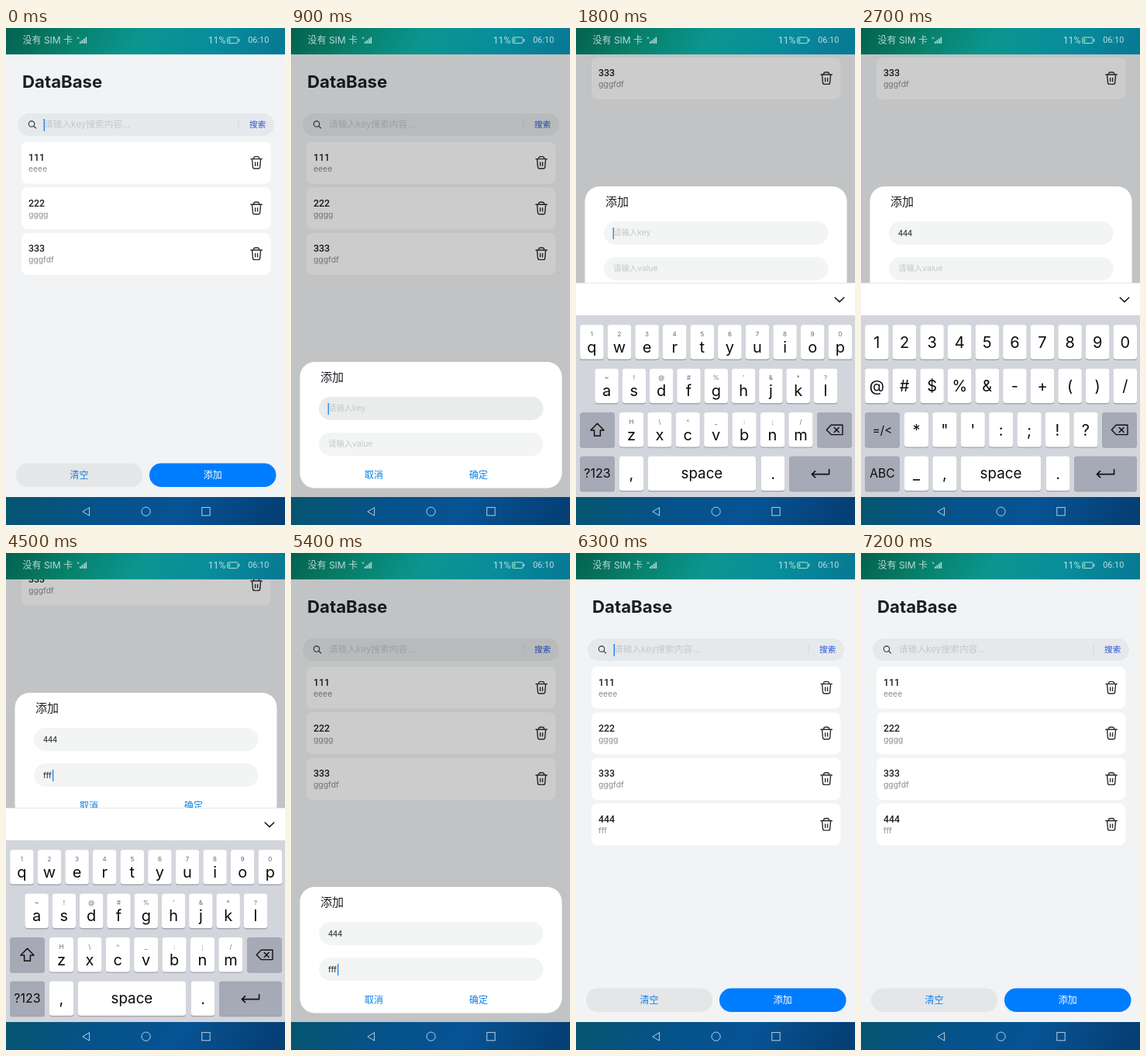
An HTML page for the animation above (8000 ms loop, 360 by 640 pixels).

```html
<!DOCTYPE html>
<html lang="zh-CN">
<head>
<meta charset="utf-8">
<title>DataBase</title>
<style>
html, body { margin: 0; width: 100%; height: 100%; overflow: hidden; background: #f1f3f5; }
svg { display: block; width: 100vw; height: 100vh; }
text { font-family: Inter, "Noto Sans CJK SC", "Noto Sans CJK", sans-serif; white-space: pre; }
.num { font-family: Roboto, "Noto Sans CJK SC", sans-serif; }
.line { fill: none; stroke-linecap: round; stroke-linejoin: round; }
</style>
</head>
<body>
<svg id="stage" viewBox="0 0 360 640">
  <defs>
    <linearGradient id="top" x2="1" y2="0.06">
      <stop offset="0" stop-color="#046150"/>
      <stop offset=".25" stop-color="#07806a"/>
      <stop offset=".5" stop-color="#0b9690"/>
      <stop offset=".78" stop-color="#088c9c"/>
      <stop offset="1" stop-color="#087b94"/>
    </linearGradient>
    <linearGradient id="bottom" x2="1" y2="0.06">
      <stop offset="0" stop-color="#05566f"/>
      <stop offset=".35" stop-color="#06528a"/>
      <stop offset=".65" stop-color="#075394"/>
      <stop offset="1" stop-color="#053f74"/>
    </linearGradient>
  </defs>
</svg>
<script>
const NS = 'http://www.w3.org/2000/svg';
const LOOP = 8000;
const BLUE = '#0a7fe8', INK = '#1b1f24', HINT = '#c5c8cb';
const stage = document.getElementById('stage');

function add(parent, tag, attrs = {}) {
  const el = document.createElementNS(NS, tag);
  for (const k in attrs) el.setAttribute(k, attrs[k]);
  return parent.appendChild(el);
}
const group = (parent, attrs) => add(parent, 'g', attrs);
const box = (parent, x, y, width, height, fill, rx = 0) =>
  add(parent, 'rect', { x, y, width, height, fill, rx });
const line = (parent, d, stroke, w = 1.4) =>
  add(parent, 'path', { d, stroke, class: 'line', 'stroke-width': w });
function label(parent, x, y, str, size, fill, extra = {}) {
  const el = add(parent, 'text', { x, y, 'font-size': size, fill, ...extra });
  el.textContent = str;
  return el;
}
const MID = { 'text-anchor': 'middle' };
const MEDIUM = { 'font-weight': 500 };
const show = (el, on) => el.setAttribute('display', on ? 'inline' : 'none');

// Page with list
const page = group(stage);
box(page, 0, 0, 360, 900, '#f1f3f5');
label(page, 21, 77, 'DataBase', 22.2, INK, { 'font-weight': 700 });

box(page, 15, 110, 331, 29, '#e6e9eb', 14.5);
add(page, 'circle', { cx: 33, cy: 123.6, r: 3.7, class: 'line', stroke: '#333', 'stroke-width': 1.1 });
line(page, 'M35.8 126.4L38.6 129', '#333', 1.1);
label(page, 49, 128.3, '请输入key搜索内容...', 11.7, HINT);
box(page, 299.5, 118, 1, 12, '#d3d6d9');
label(page, 324.7, 127.6, '搜索', 10.6, '#2b55d6', { ...MID, ...MEDIUM });
const searchCaret = box(page, 48.6, 117, 1.4, 16, '#1a80ee');

function card(i, key, value) {
  const g = group(page, { transform: `translate(0 ${i * 58.7})` });
  box(g, 20, 146.5, 321.5, 54, '#fff', 8);
  label(g, 29, 171, key, 12.4, INK, { ...MEDIUM, class: 'num' });
  label(g, 29, 185, value, 10.4, '#8b8e91');
  line(g, 'M315.9 168.6H330.3M319.3 168.4Q319.8 165.6 321.6 165.6H324.6Q326.4 165.6 326.9 168.4'
    + 'M317.6 168.8L318.5 179Q318.7 181 320.6 181H325.6Q327.5 181 327.7 179L328.6 168.8'
    + 'M321.6 173V177.4M324.6 173V177.4', '#2a2d31', 1.4);
  return g;
}
[['111', 'eeee'], ['222', 'gggg'], ['333', 'gggfdf']].forEach((r, i) => card(i, ...r));
const newCard = card(3, '444', 'fff');

box(page, 13, 560.5, 163, 30.5, '#e4e6e8', 15.2);
label(page, 94.5, 580, '清空', 12, '#157fe8', { ...MID, ...MEDIUM });
box(page, 185, 560.5, 163.5, 30.5, '#007dff', 15.2);
label(page, 266.7, 580, '添加', 12, '#fff', { ...MID, ...MEDIUM });

// Dialog
const shade = box(stage, 0, 0, 360, 640, '#000');
shade.setAttribute('fill-opacity', 0.2);
const dialog = group(stage);
box(dialog, 11.5, 430, 338, 162.5, '#fff', 19);
label(dialog, 38, 454.6, '添加', 15, INK, MEDIUM);

function field(y, hint, text, cls) {
  const bg = box(dialog, 36, y, 289.5, 30, '#f3f4f4', 15);
  const ghost = label(dialog, 48, y + 18.3, hint, 10.4, HINT);
  const typed = label(dialog, 48, y + 18.8, text, 10.6, '#26292c', { class: cls });
  const caret = box(dialog, 48, y + 8, 1.3, 15, '#1486ec');
  return (filled, focused, dark) => {
    bg.setAttribute('fill', dark ? '#eaebeb' : '#f3f4f4');
    show(ghost, !filled);
    show(typed, filled);
    show(caret, focused);
    caret.setAttribute('x', filled ? 60 : 47.6);
  };
}
const setKey = field(475, '请输入key', '444', 'num');
const setValue = field(521, '请输入value', 'fff', '');
label(dialog, 107, 580, '取消', 12, BLUE, { ...MID, ...MEDIUM });
label(dialog, 242, 580, '确定', 12, BLUE, { ...MID, ...MEDIUM });

// Keyboard
const board = group(stage);
box(board, 0, 328, 360, 42, '#fff');
box(board, 0, 328, 360, 0.8, '#dfe1e3');
box(board, 0, 370, 360, 234, '#d3d5dc');
line(board, 'M334.3 347.2L340 352.8L345.7 347.2', '#111', 1.6);

const rowY = r => 382.3 + r * 56.4;
function key(parent, row, x, w, str, opt = {}) {
  const y = rowY(row);
  box(parent, x, y + 1.2, w, 44.5, '#a4a6ad', 3.5);
  box(parent, x, y, w, 44.3, opt.mod ? '#a6a9b6' : '#fff', 3.5);
  if (opt.sub) label(parent, x + w / 2, y + 14.6, opt.sub, 8, '#66686c', MID);
  if (str) label(parent, x + w / 2, y + (opt.dy || 29.4), str, opt.size || 20, '#0c0c0e', MID);
}
function keys(parent, row, x, step, w, chars, subs = '') {
  [...chars].forEach((c, i) =>
    key(parent, row, x + i * step, w, c, subs ? { sub: subs[i], dy: 35.4 } : {}));
}

const common = group(board);
key(common, 2, 311, 45, '', { mod: true });
line(common, 'M323.3 517.4L329.2 511.2H344V523.6H329.2ZM333.2 514.4L339.2 520.4M339.2 514.4L333.2 520.4', '#111', 1.4);
key(common, 3, 238.8, 30.5, '.');
key(common, 3, 275, 81, '', { mod: true });
line(common, 'M326.6 568.6V574.6H304.4M308.6 570.6L304.4 574.6L308.6 578.6', '#111', 1.6);

const digits = group(board);
keys(digits, 0, 5.2, 35.6, 30.4, '1234567890');
keys(digits, 1, 5.2, 35.6, 30.4, '@#$%&-+()/');
key(digits, 2, 5, 45, '=/<', { mod: true, size: 15, dy: 27.4 });
keys(digits, 2, 56, 36.4, 31, '*"\':;!?');
key(digits, 3, 5, 45, 'ABC', { mod: true, size: 15.6, dy: 27.8 });
keys(digits, 3, 56, 36.4, 31, '_,');
key(digits, 3, 129, 103, 'space', { size: 18.8, dy: 28.4 });

const letters = group(board);
keys(letters, 0, 5.2, 35.6, 30.4, 'qwertyuiop', '1234567890');
keys(letters, 1, 24.4, 35.3, 30.4, 'asdfghjkl', '~!@#%\'&*?');
key(letters, 2, 5, 45, '', { mod: true });
line(letters, 'M27.5 509.3L36 518H31.4V525.2H23.6V518H19Z', '#111', 1.5);
keys(letters, 2, 56, 36.4, 31, 'zxcvbnm', 'H\\^_:;/');
key(letters, 3, 5, 45, '?123', { mod: true, size: 16, dy: 27.8 });
key(letters, 3, 56, 31, ',');
key(letters, 3, 92.8, 139.2, 'space', { size: 18.8, dy: 28.4 });

// System bars
const bars = group(stage);
const PALE = 'rgba(255,255,255,.72)';
box(bars, 0, 0, 360, 34, 'url(#top)');
label(bars, 21.5, 20, '没有 SIM 卡', 12, PALE);
line(bars, 'M92 11.8L94 13.8M94 11.8L92 13.8', PALE, 0.8);
for (let i = 0; i < 4; i++) box(bars, 95 + i * 2.5, 17.4 - i * 1.9, 1.6, 2.6 + i * 1.9, PALE);
label(bars, 283.5, 20, '11%', 12.3, PALE, { 'text-anchor': 'end', class: 'num' });
add(bars, 'rect', { x: 285.7, y: 12, width: 13.4, height: 7.6, rx: 1.6, fill: 'none', stroke: PALE });
box(bars, 287, 13.4, 2.4, 4.8, '#4fe08a');
box(bars, 300.2, 14, 1.2, 3.6, PALE, 0.5);
label(bars, 339.3, 19.4, '06:10', 10.9, PALE, { 'text-anchor': 'end', class: 'num' });

box(bars, 0, 604, 360, 36, 'url(#bottom)');
line(bars, 'M99.2 622.6L107.6 617.6V627.6Z', PALE, 1);
add(bars, 'circle', { cx: 180.6, cy: 622.6, r: 5.6, fill: 'none', stroke: PALE });
add(bars, 'rect', { x: 252.8, y: 617.4, width: 10.4, height: 10.4, fill: 'none', stroke: PALE });

// One scene every 900 ms; lift is how far the page moves up for the keyboard
const scenes = [
  { caret: 'search' },
  { dialog: true, caret: 'key', dark: true },
  { dialog: true, caret: 'key', lift: 226, board: 'letters' },
  { dialog: true, key: true, lift: 226, board: 'digits' },
  { dialog: true, key: true, caret: 'value', lift: 250, board: 'digits' },
  { dialog: true, key: true, value: true, caret: 'value', lift: 250, board: 'letters' },
  { dialog: true, key: true, value: true, caret: 'value' },
  { saved: true, caret: 'search' },
  { saved: true }
];

function render(ms) {
  const s = scenes[Math.min(Math.floor(ms / 900), scenes.length - 1)];
  const move = `translate(0 ${-(s.lift || 0)})`;
  page.setAttribute('transform', move);
  dialog.setAttribute('transform', move);
  show(searchCaret, s.caret === 'search');
  show(newCard, !!s.saved);
  show(shade, !!s.dialog);
  show(dialog, !!s.dialog);
  setKey(!!s.key, s.caret === 'key', s.dark);
  setValue(!!s.value, s.caret === 'value');
  show(board, !!s.board);
  show(digits, s.board === 'digits');
  show(letters, s.board === 'letters');
}

const start = performance.now();
function tick() {
  render((performance.now() - start) % LOOP);
  requestAnimationFrame(tick);
}
tick();
</script>
</body>
</html>
```
